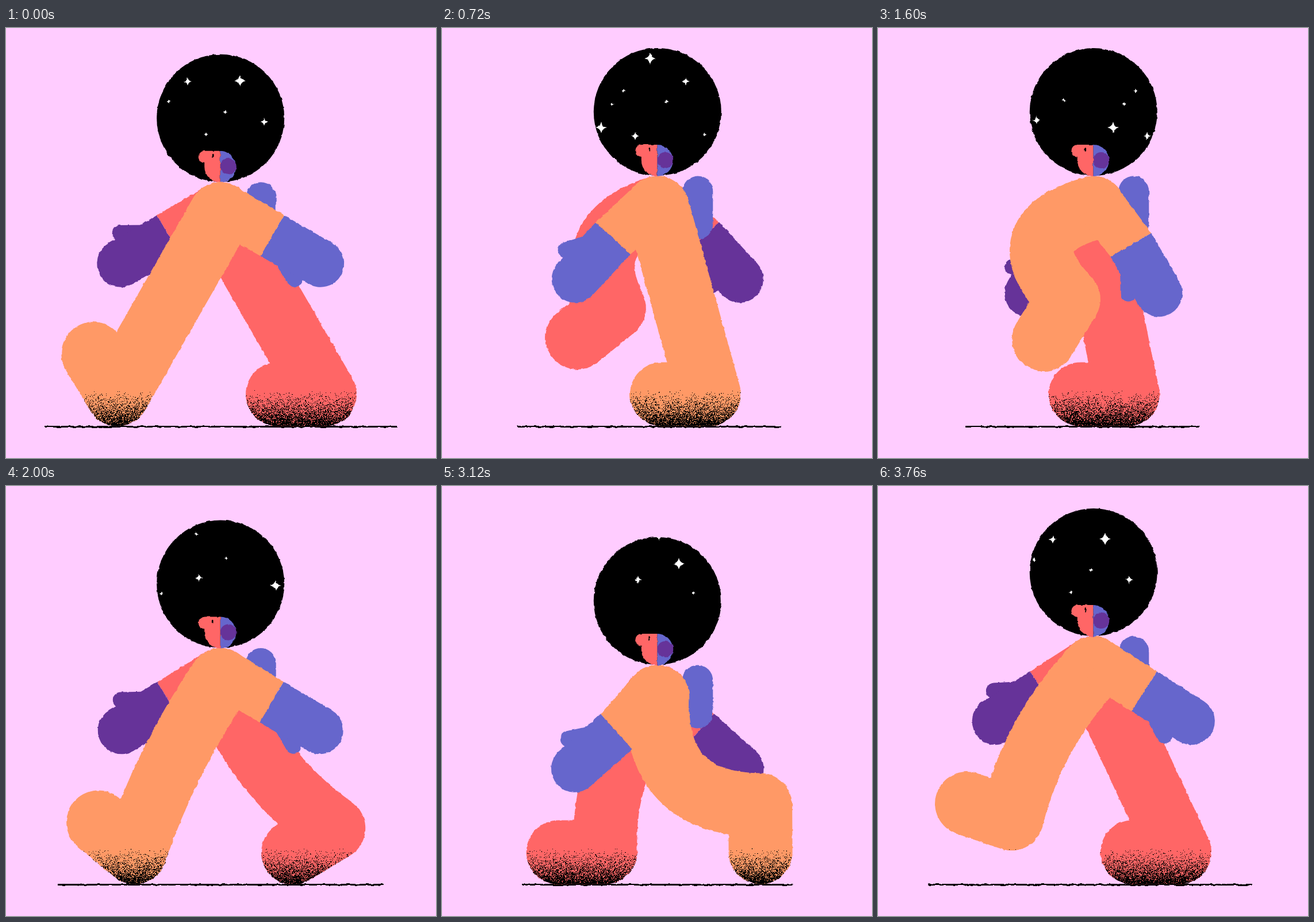
An HTML page with a canvas that plays this animation: 748x748 px, repeating every 3840 ms.

```html
<!DOCTYPE html>
<html lang="en">
<head>
<meta charset="utf-8">
<title>Walk cycle</title>
<style>
  html, body { margin: 0; width: 100%; height: 100%; overflow: hidden; background: #fcf; }
  canvas { display: block; width: 748px; height: 748px; filter: url(#rough); }
  svg { position: absolute; width: 0; height: 0; }
</style>
</head>
<body>
<svg aria-hidden="true">
  <filter id="rough" x="0" y="0" width="100%" height="100%" color-interpolation-filters="sRGB">
    <feTurbulence id="grain" type="fractalNoise" baseFrequency="0.12" numOctaves="2" result="n"/>
    <feDisplacementMap in="SourceGraphic" in2="n" scale="3.6" xChannelSelector="R" yChannelSelector="G"/>
  </filter>
</svg>
<canvas id="stage" width="748" height="748"></canvas>
<script>
const SIZE = 748, STEP = 80, LOOP = 3840, HALF = 960, CYCLE = 2 * HALF;
const BG = '#fcf', ORANGE = '#f96', RED = '#f66', PURPLE = '#639', BLUE = '#66c';
const R = 55.5, FOOT = 82, HEAD = 111, PALM = 41;
const { PI, sin, cos, min, max } = Math;

const ctx = document.getElementById('stage').getContext('2d');
const grain = document.getElementById('grain');
const rad = deg => deg * PI / 180;
const mod = (a, b) => ((a % b) + b) % b;

// Sum of sine harmonics: a sin p + b sin 2p + ...
const waves = (p, ...amps) => amps.reduce((sum, a, i) => sum + a * sin((i + 1) * p), 0);

function random(seed) {
  return () => {
    seed = (seed + 0x6D2B79F5) | 0;
    let t = Math.imul(seed ^ (seed >>> 15), 1 | seed);
    t = (t + Math.imul(t ^ (t >>> 7), 61 | t)) ^ t;
    return ((t ^ (t >>> 14)) >>> 0) / 4294967296;
  };
}

// The body sinks after each step and rises over the planted leg.
function headHeight(time) {
  const p = 2 * PI * time / HALF;
  return 167.4 - 5.1 * cos(p) - 5.5 * cos(2 * p) + waves(p, 27, -3.8);
}

// The ground shortens under one foot and stretches for the next step.
function ground(time) {
  const t = mod(time, HALF);
  return [67 + min(0.3 * t, 0.266 * (HALF - t)), max(680 - 0.29 * t, 319 + 0.376 * t)];
}

// Half a cycle planted and sliding back, half a cycle swinging forward.
function legPose(time) {
  const t = mod(time, CYCLE), s = t / HALF - 1, p = PI * s;
  if (t < HALF) return {
    x: 194 + 0.3756 * t,
    y: 637,
    angle: 180 + 59 * max(0, 1 - t / 240),
    bend: 60 * max(0, sin(PI * min(1, t / 660)))
  };
  return {
    x: 554.5 - 360.5 * s + waves(p, 57, 37, 17),
    y: 637 + waves(p, -147, 34, -17, -10),
    angle: 180 + 59 * s + waves(p, -130, -11, -3, 6),
    bend: waves(p, 172, 12)
  };
}

function armPose(time) {
  const p = 2 * PI * time / CYCLE;
  return {
    hand: 90 - 62.2 * cos(p) + 2.2 * cos(3 * p) - 3.8 * sin(p),
    cuff: 90 - 71 * cos(p) + 3.6 * cos(3 * p) + waves(p, 7.3, 0, -3.3),
    reach: 93.5 + 4 * cos(2 * p)
  };
}

// Star radius, then x at time zero and y of each.
const stars = [
  [10, [[407, 92], [254, 53], [169, 173], [-56, 135]]],
  [7, [[316, 93], [449, 163], [228, 188], [36, 160], [-91, 87]]],
  [3.5, [[382, 146], [348, 185], [283, 128], [208, 109], [188, 132], [31, 84], [83, 126], [-30, 187]]]
];
const DRIFT = 0.15, FIELD = LOOP * DRIFT;

function makeStipple() {
  const tile = document.createElement('canvas');
  tile.width = tile.height = SIZE;
  const g = tile.getContext('2d'), rnd = random(7);
  for (let y = 630; y < 696; y++) {
    const p = min(0.95, ((y - 629) / 64) ** 1.5);
    for (let x = 0; x < SIZE; x++) if (rnd() < p) g.fillRect(x, y, 1, 1);
  }
  return ctx.createPattern(tile, 'repeat');
}
const stipple = makeStipple();

function disc(x, y, r, color) {
  ctx.fillStyle = color;
  ctx.beginPath();
  ctx.arc(x, y, r, 0, 7);
  ctx.fill();
}

function line(x1, y1, x2, y2, width, color, cap = 'round') {
  ctx.strokeStyle = color;
  ctx.lineWidth = width;
  ctx.lineCap = cap;
  ctx.beginPath();
  ctx.moveTo(x1, y1);
  ctx.lineTo(x2, y2);
  ctx.stroke();
}

function drawLeg(time, hx, hy, color) {
  const { x, y, angle, bend } = legPose(time);
  const a = rad(angle), k = bend / Math.hypot(x - hx, y - hy);
  ctx.lineWidth = 2 * R;
  ctx.lineCap = ctx.lineJoin = 'round';
  ctx.beginPath();
  ctx.moveTo(hx, hy);
  ctx.quadraticCurveTo((hx + x) / 2 - (y - hy) * k, (hy + y) / 2 + (x - hx) * k, x, y);
  ctx.lineTo(x + FOOT * cos(a), y + FOOT * sin(a));
  for (const paint of [color, stipple]) {
    ctx.strokeStyle = paint;
    ctx.stroke();
  }
}

function drawArm(time, hx, hy, back) {
  const { hand, cuff, reach } = armPose(time);
  const a = rad(back ? 180 - hand : hand), c = rad(back ? 180 - cuff : cuff);
  const dx = cos(a), dy = sin(a);
  const cx = hx + reach * cos(c), cy = hy + reach * sin(c);
  const lean = 13 * max(-1, min(1, -3 * dx));
  const skin = back ? PURPLE : BLUE;

  // Sleeve, tapering from the shoulder to the cuff.
  ctx.fillStyle = back ? RED : ORANGE;
  ctx.beginPath();
  for (const [x, y, k] of [[hx, hy, 42 + lean], [hx, hy, lean - 42], [cx, cy, -PALM], [cx, cy, PALM]]) {
    ctx.lineTo(x - dy * k, y + dx * k);
  }
  ctx.fill();

  // Mitten with its thumb.
  ctx.save();
  ctx.translate(cx, cy);
  ctx.rotate(a);
  line(25, 20, 71, 46, 28, skin);
  ctx.fillStyle = skin;
  ctx.beginPath();
  ctx.moveTo(0, -PALM);
  ctx.arc(97, 0, PALM, -PI / 2, PI / 2);
  ctx.lineTo(0, PALM);
  ctx.fill();
  ctx.restore();
}

function drawStar(x, y, r) {
  const k = r * 0.16;
  ctx.beginPath();
  ctx.moveTo(x, y - r);
  ctx.quadraticCurveTo(x + k, y - k, x + r, y);
  ctx.quadraticCurveTo(x + k, y + k, x, y + r);
  ctx.quadraticCurveTo(x - k, y + k, x - r, y);
  ctx.quadraticCurveTo(x - k, y - k, x, y - r);
  ctx.fill();
}

function drawHead(time, x, y) {
  ctx.save();
  disc(x, y, HEAD, '#000');
  ctx.clip();
  ctx.fillStyle = '#fff';
  for (const [r, spots] of stars) {
    for (const [u, v] of spots) drawStar(150 + mod(u + DRIFT * time - 150, FIELD), v, r);
  }
  ctx.restore();

  ctx.save();
  ctx.translate(x - 0.5, y + 84.5);
  ctx.fillStyle = BLUE;
  ctx.beginPath();
  ctx.arc(0, 0, 27.5, -PI / 2, PI / 2);
  ctx.fill();
  disc(14, -0.5, 14, PURPLE);
  ctx.fillStyle = RED;
  ctx.beginPath();
  ctx.moveTo(0, -27.5);
  ctx.arc(-27.5, -17, 10.5, -PI / 2, PI / 2, true);
  ctx.lineTo(-27.5, 0);
  ctx.arc(0, 0, 27.5, PI, PI / 2, true);
  ctx.fill();
  line(-13.5, -21, -13.5, -17, 2.6, '#000');
  ctx.restore();
}

function draw(frame) {
  const time = frame * STEP;
  const headY = headHeight(time), [left, right] = ground(time);
  const hx = 374 + (frame % 24 < 9 ? -0.8 : 0.8), hy = headY + 167;

  grain.setAttribute('seed', frame + 1);
  stipple.setTransform(new DOMMatrix().translate(frame * 137 % SIZE, 0));

  ctx.fillStyle = BG;
  ctx.fillRect(0, 0, SIZE, SIZE);
  line(left, 693.5, right, 693.5, 2.8, '#000', 'butt');
  drawArm(time, hx, hy, true);
  drawLeg(time + HALF, hx, hy, RED);
  line(hx + 70, hy - 29, hx + 70, hy + 28, 53, BLUE);
  drawLeg(time, hx, hy, ORANGE);
  drawArm(time, hx, hy, false);
  drawHead(time, hx, headY);
}

const start = performance.now();
let shown = -1;
function tick() {
  const frame = Math.floor(mod(performance.now() - start, LOOP) / STEP);
  if (frame !== shown) draw(shown = frame);
  requestAnimationFrame(tick);
}
tick();
</script>
</body>
</html>
```
